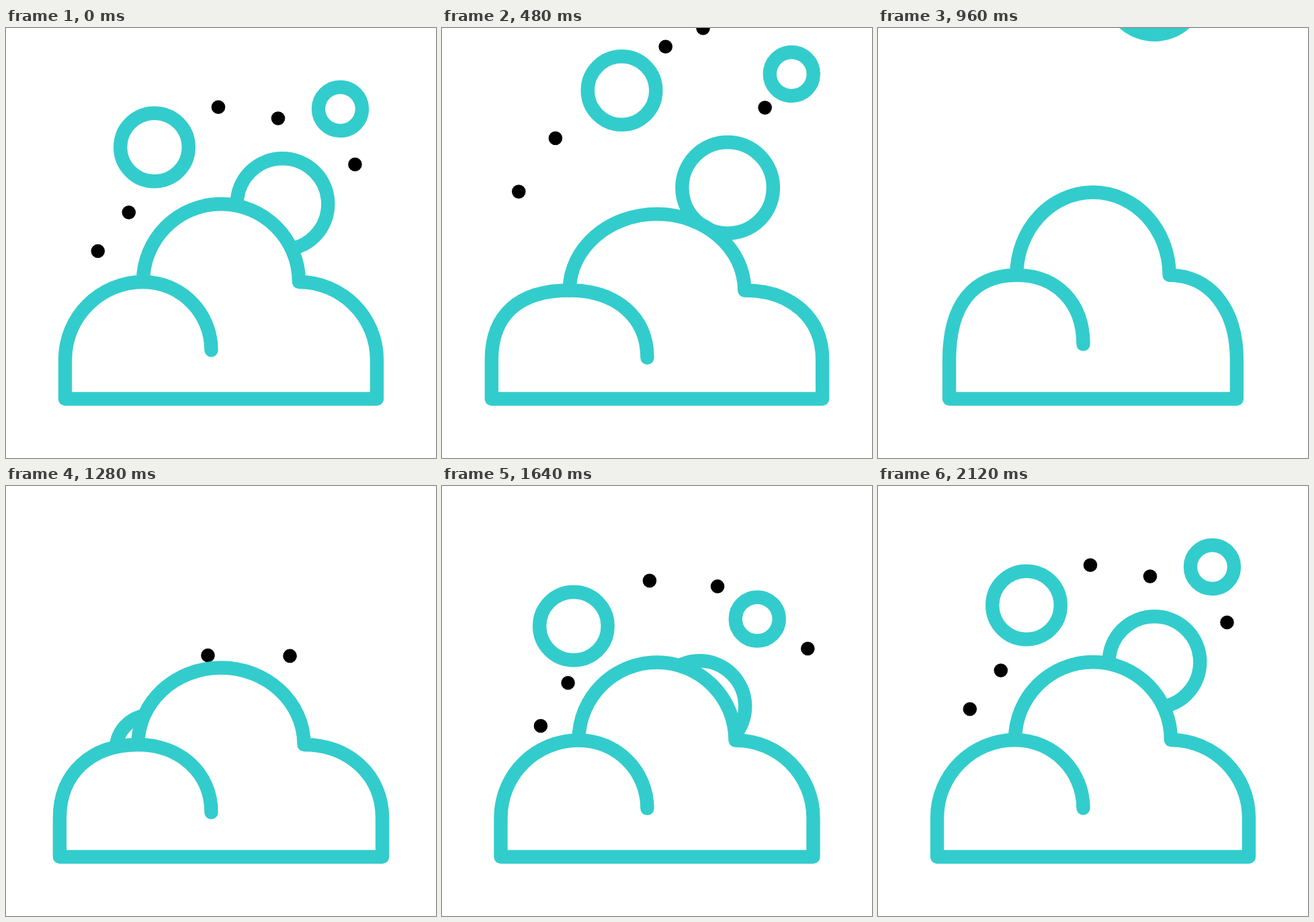
Recreate the animation shown at these times as an HTML page. Size 640 by 640 pixels, loop 2.24 s.

```html
<!DOCTYPE html>
<html lang="en">
<head>
<meta charset="utf-8">
<title>Foam bubbles</title>
<style>
  html, body { margin: 0; width: 100%; height: 100%; overflow: hidden; background: #fff; }
  svg { display: block; width: 100%; height: 100%; }
  .line { fill: none; stroke: #3cc; stroke-width: 20.4; stroke-linecap: round; stroke-linejoin: round; }
  #body { fill: #fff; }
  .dot { fill: #000; }
</style>
</head>
<body>
<svg viewBox="0 0 640 640">
  <g id="bubbles"></g>
  <path id="body" class="line"/>
  <path id="curl" class="line"/>
</svg>
<script>
const LOOP = 2240, STEP = 40, REENTRY = 1100;
const MID = 320, BASE = 552, SIDE = 494, CURL_X = 305.5;
const ARC = 0.5523;
// Bubbles start at FLOOR, speed away at RISE and sway once per SWAY of height
const FLOOR = 455, RISE = 0.00073, SWAY = 225, DOT = 10.3;

// Cloud poses: outer half width, bump half width, shoulder, top and curl heights, roundness
const rest = [232, 116, 378, 262, 479.5, ARC];
const squash = [248.3, 131.3, 392, 279, 492, 0.65];
const stretch = [213.5, 113.5, 367.6, 244, 470.4, 0.65];
const mix = (a, b, p) => a.map((v, i) => v + (b[i] - v) * p);
const poses = [[60, rest], [400, squash], [940, stretch], [1200, mix(rest, squash, 0.53)], [1720, rest]];

const bubbles = [
  { x: 221, y: 177.5, r: 50.8, swing: 48, leave: 140, enter: 1200, settle: 1861 },
  { x: 411.5, y: 262, r: 67.8, swing: 32, leave: 298, enter: 1330, settle: 2077 },
  { x: 497.5, y: 120.5, r: 32.5, swing: 30, leave: 213, enter: 1280, settle: 1974 },
  { x: 136.8, y: 332, r: DOT, swing: -23, leave: 132, enter: 1240, settle: 1969 },
  { x: 182.8, y: 274.5, r: DOT, swing: -14, leave: 91, enter: 1200, settle: 1847 },
  { x: 316, y: 117.7, r: DOT, swing: 17, leave: 129, enter: 920, settle: 1896 },
  { x: 405, y: 134.5, r: DOT, swing: -18, leave: 51, enter: 920, settle: 1838 },
  { x: 519.5, y: 203, r: DOT, swing: -40, leave: 140, enter: 1240, settle: 1899 }
];

const $ = id => document.getElementById(id);
const clamp = (v, lo = 0, hi = 1) => Math.min(hi, Math.max(lo, v));

for (const b of bubbles) {
  b.circle = document.createElementNS("http://www.w3.org/2000/svg", "circle");
  b.circle.setAttribute("class", b.r === DOT ? "dot" : "line");
  b.circle.setAttribute("r", b.r);
  $("bubbles").append(b.circle);
}

function poseAt(t) {
  const next = poses.findIndex(([time]) => t < time);
  if (next < 1) return rest;
  const [t0, from] = poses[next - 1], [t1, to] = poses[next];
  const p = (t - t0) / (t1 - t0);
  return mix(from, to, p * p * (3 - 2 * p));
}

// Quarter turn from (x0, y0) to (x1, y1); upright means it starts vertically
function quarter(x0, y0, x1, y1, upright, k = ARC) {
  const dx = (x1 - x0) * k, dy = (y1 - y0) * k;
  return upright
    ? `C${x0} ${y0 + dy} ${x1 - dx} ${y1} ${x1} ${y1}`
    : `C${x0 + dx} ${y0} ${x1} ${y1 - dy} ${x1} ${y1}`;
}

function drawCloud(t) {
  const [half, bump, shoulder, top, curlY, round] = poseAt(t);
  const left = MID - half, right = MID + half, a = MID - bump, b = MID + bump;
  const softer = (round + ARC) / 2;
  $("body").setAttribute("d", `M${left} ${BASE}V${SIDE}`
    + quarter(left, SIDE, a, shoulder, true, round)
    + quarter(a, shoulder, MID, top, true)
    + quarter(MID, top, b, shoulder, false)
    + quarter(b, shoulder, right, SIDE, false, softer)
    + `V${BASE}Z`);
  $("curl").setAttribute("d", `M${a} ${shoulder}`
    + quarter(a, shoulder, CURL_X, curlY, false, softer));
}

function drawBubble(t, { x, y, swing, leave, enter, settle, circle }) {
  const lift = t < REENTRY
    ? RISE * Math.max(0, t - leave) ** 2
    : (y - FLOOR) * clamp((settle - t) / (settle - enter)) ** 2;
  const turn = Math.sign(lift) * clamp(Math.abs(lift) / SWAY) ** 0.88;
  circle.setAttribute("cx", x + swing * Math.sin(Math.PI * turn));
  circle.setAttribute("cy", y - lift);
}

function draw(time) {
  const t = Math.floor(time % LOOP / STEP) * STEP;
  drawCloud(t);
  bubbles.forEach(b => drawBubble(t, b));
}

let start;
function tick(now) {
  start ??= now;
  draw(now - start);
  requestAnimationFrame(tick);
}
draw(0);
requestAnimationFrame(tick);
</script>
</body>
</html>
```
